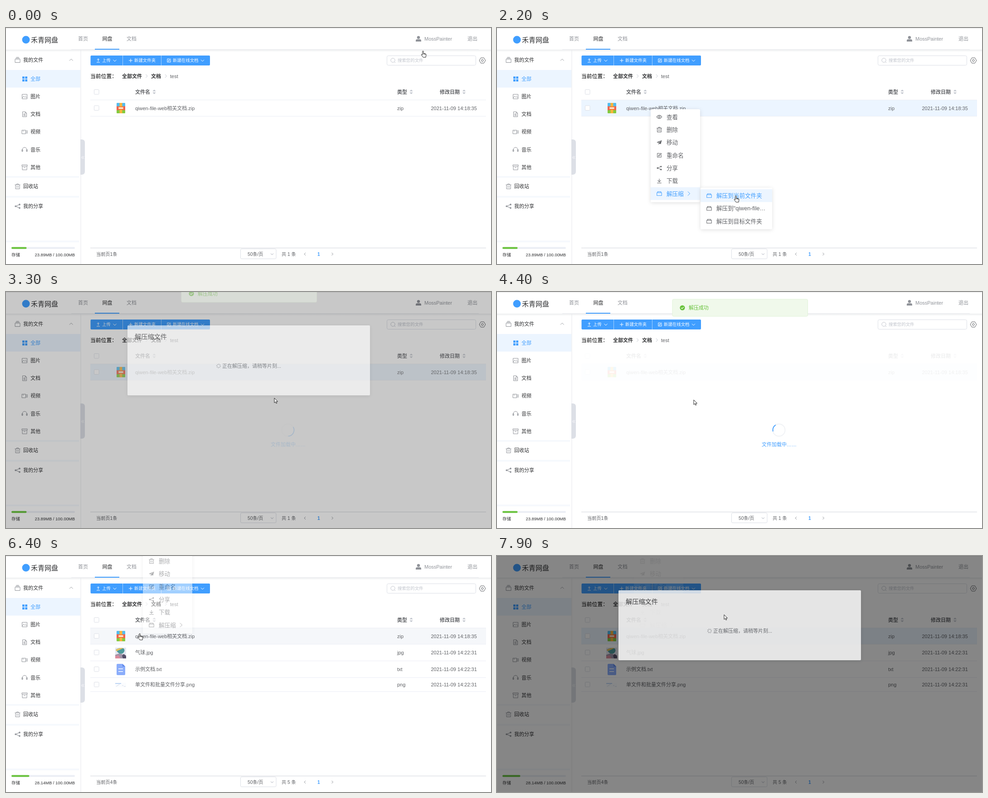
Recreate the animation shown at these times as an HTML page. Size 1070x523 px, loop 8 s.

```html
<!DOCTYPE html>
<html lang="zh-CN">
<head>
<meta charset="utf-8">
<title>网盘在线解压缩</title>
<style>
html, body { margin: 0; width: 100%; height: 100%; overflow: hidden; background: #fff; }
svg { display: block; font-family: "Liberation Sans", "Noto Sans CJK SC", "Noto Sans CJK", sans-serif; }
text { white-space: pre; }
</style>
</head>
<body>
<svg id="stage" width="1070" height="523" viewBox="0 0 1070 523"></svg>
<script>
const LOOP = 8000, STEP = 100;
const BLUE = '#409eff', TEXT = '#606266', DARK = '#303133', GREY = '#909399', PALE = '#c0c4cc';
const LINE = '#dcdfe6', SOFT = '#ebeef5', GREEN = '#67c23a', TINT = '#ecf5ff';
const stage = document.getElementById('stage');

const set = (e, attrs) => { for (const k in attrs) e.setAttribute(k, attrs[k]); return e; };
const add = (parent, tag, attrs = {}) =>
  parent.appendChild(set(document.createElementNS('http://www.w3.org/2000/svg', tag), attrs));
const group = (parent, attrs) => add(parent, 'g', attrs);
const box = (p, x, y, width, height, fill, more) => add(p, 'rect', { x, y, width, height, fill, ...more });
const ring = (p, cx, cy, r, color, width = 1) =>
  add(p, 'circle', { cx, cy, r, fill: 'none', stroke: color, 'stroke-width': width });
const disc = (p, cx, cy, r, fill) => add(p, 'circle', { cx, cy, r, fill });
const stroke = (p, d, color, width = 1, more) =>
  add(p, 'path', { d, fill: 'none', stroke: color, 'stroke-width': width, ...more });
const shape = (p, d, fill) => add(p, 'path', { d, fill });
const label = (p, x, mid, str, size, fill, more) => {
  const e = add(p, 'text', { x, y: mid + size * 0.37, 'font-size': size, fill, ...more });
  e.textContent = str;
  return e;
};
const BOLD = { 'font-weight': 700 };
const move = (e, x, y) => set(e, { transform: `translate(${x} ${y})` });
const fade = (e, a) => set(e, { opacity: a, display: a > 0 ? 'inline' : 'none' });

// Line icons, centred on 0,0
const ICONS = {
  stack: 'M-5.5-2h11v7.5h-11zM-4.5-4h9M-3-6h6',
  image: 'M-5.5-5h11v10h-11zM-5 3l3-4 2.5 2.5 2-1.5 3 3M2-2h1',
  doc: 'M-4.5-5.5h6l3 3v8h-9zM1.5-5.5v3h3M-2.5-1h4M-2.5 1h5M-2.5 3h5',
  video: 'M-6-4h8.5v8H-6zM2.5-1l3.5-2v6l-3.5-2M-4-2h2',
  music: 'M-5 4v-4a5 5 0 0 1 10 0v4M-5 0h-1v4h2V0zM5 0h1v4H4V0z',
  archive: 'M-6-5.5H6v3H-6zM-5-2.5v8H5v-8M-2 .5h4',
  trash: 'M-6-3.5H6M-4.5-3.5v9h9v-9M-2-3.5v-2h4v2M-1.5-1v4M1.5-1v4',
  eye: 'M-6 0q6-8 12 0q-6 8-12 0zM-1.8 0a1.8 1.8 0 1 0 3.6 0a1.8 1.8 0 1 0-3.6 0',
  edit: 'M1-4.5h-5.5v9h9V-1M-2 2l.5-2 5-5 1.5 1.5-5 5z',
  down: 'M0-5v7M-3.5-1L0 2.5 3.5-1M-5 5H5',
  upload: 'M0 2v-6M-2.5-1.5L0-4l2.5 2.5M-3.5 4h7',
  plus: 'M-4 0h8M0-4v8',
  box: 'M-5.5-2h11v6.5h-11zM-4-2v-2.5h8V-2',
  gear: 'M-3.4-5.9h6.8l3.4 5.9-3.4 5.9h-6.8l-3.4-5.9zM-2.3 0a2.3 2.3 0 1 0 4.6 0a2.3 2.3 0 1 0-4.6 0',
  right: 'M-2-4.5L2.5 0-2 4.5',
  dropdown: 'M-3.5-1.5L0 2l3.5-3.5'
};
const icon = (p, name, x, y, color = TEXT, scale = 1) => {
  const g = group(p, { transform: `translate(${x} ${y}) scale(${scale})`, color });
  if (name === 'plane') shape(g, 'M6-5.5L-6-.5l3.5 1.5zM6-5.5L-1.5 1.5v4l2-3 3 1.5z', 'currentColor');
  else if (name === 'share') {
    stroke(g, 'M4-3.5L-4 0l8 3.5', 'currentColor');
    for (const [x, y] of [[4, -3.5], [-4, 0], [4, 3.5]]) disc(g, x, y, 1.7, 'currentColor');
  } else stroke(g, ICONS[name], 'currentColor', 1 / scale, { 'stroke-linejoin': 'round' });
  return g;
};
const carets = (x, y) => {
  for (const s of [-1, 1]) shape(stage, `M${x - 3.7} ${y + 1.3 * s}h7.4l-3.7 ${3.7 * s}z`, PALE);
};
const checkbox = (p, y) => box(p, 194.5, y - 5.5, 10.5, 10.5, '#fff', { stroke: LINE, rx: 1.5 });

const defs = add(stage, 'defs');
const filter = add(defs, 'filter', { id: 'soft', x: '-20%', y: '-20%', width: '140%', height: '140%' });
add(filter, 'feDropShadow', { dx: 0, dy: 1.5, stdDeviation: 4, 'flood-color': 'rgba(0,0,0,.12)' });
const gradient = add(defs, 'linearGradient', { id: 'under', x2: 0, y2: 1 });
add(gradient, 'stop', { 'stop-color': '#e9eaec' });
add(gradient, 'stop', { offset: 1, 'stop-color': '#fff', 'stop-opacity': 0 });

box(stage, 0, 0, 1070, 523, '#fff');

// Table
const art = {
  zip(g) {
    box(g, 244, 166, 19, 23, '#f0604d', { rx: 2 });
    box(g, 244, 166, 19, 7.5, '#52bdf0', { rx: 1.5 });
    box(g, 244, 182, 19, 7, '#83cb3f', { rx: 1.5 });
    box(g, 250.5, 166, 6, 23, '#f8b53c');
    box(g, 247.5, 174, 12, 7, '#f57f45', { rx: 1 });
    box(g, 248.5, 176, 10, 3, '#fff3df');
  },
  jpg(g) {
    box(g, 241, 203, 24, 24, '#e4e6f0');
    shape(g, 'M241 219l9-3 15 4v7h-24z', '#a294a8');
    shape(g, 'M242 208q8-6 18-3q4 6-3 11q-6 2-10-2z', '#4d9a9b');
    shape(g, 'M242 208q8-5 17-4l-15 7z', '#e8c45c');
    shape(g, 'M241 222l7-2 5 7h-12z', '#d98a9c');
    shape(g, 'M256 221l4-4 5 5v5h-7z', '#544e69');
  },
  txt(g) {
    shape(g, 'M246 239h11l6 6v17q0 2-2 2h-15q-2 0-2-2v-21q0-2 2-2z', '#8badfb');
    shape(g, 'M257 239l6 6h-6z', '#5f87e8');
    stroke(g, 'M248 250h10M248 256h10', '#fff', 1.6);
  },
  png(g) {
    box(g, 241, 281, 24, 10, '#fbfcfe');
    stroke(g, 'M241 282.5h13', '#9fc0ee', 1.4);
    stroke(g, 'M243 289l8-5M256 287h3M260 289h4', '#d3dbe9', 1);
  }
};
label(stage, 285, 142, '文件名', 11, TEXT, BOLD);
label(stage, 863, 142, '类型', 11, TEXT, BOLD);
label(stage, 957, 142, '修改日期', 11, TEXT, BOLD);
for (const x of [327, 894, 1010.5]) carets(x, 141.5);
checkbox(stage, 142);
box(stage, 186, 159, 873, 1, SOFT);
let bottom = 160;
const rows = ['qiwen-file-web相关文档.zip', '气球.jpg', '示例文档.txt', '单文件和批量文件分享.png'].map((name, i) => {
  const kind = name.split('.').pop(), top = bottom;
  const height = kind === 'png' ? 31 : i ? 37 : 36, mid = top + height / 2 - 0.5;
  bottom += height;
  const g = group(stage);
  const hover = box(g, 186, top, 873, height, '#f5f7fa');
  const picked = box(g, 186, top, 873, height, TINT);
  box(g, 186, bottom - 1, 873, 1, SOFT);
  checkbox(g, mid);
  art[kind](g);
  label(g, 285, mid, name, 11, TEXT);
  label(g, 863, mid, kind, 11, TEXT);
  label(g, 937.5, mid, '2021-11-09 ' + (i ? '14:22:31' : '14:18:35'), 11, TEXT);
  return { g, hover, picked, top, bottom };
});

// Loading mask
const loading = group(stage);
box(loading, 186, 125, 873, 360, '#fff', { 'fill-opacity': 0.9 });
ring(loading, 622, 306, 13.5, '#f0f2f5', 1.8);
const arc = stroke(loading, '', BLUE, 1.8, { 'stroke-linecap': 'round' });
label(loading, 584, 338, '文件加载中……', 11, BLUE);

// Header
box(stage, 0, 0, 1070, 48, '#fff');
box(stage, 0, 48, 1070, 7, 'url(#under)');
box(stage, 0, 0, 1070, 1, '#e4e4e4');
box(stage, 144, 47, 899, 1, '#eceef1');
disc(stage, 44, 26, 8.5, BLUE);
label(stage, 55, 26, '禾青网盘', 15, DARK);
['首页', '网盘', '文档'].forEach((str, i) => label(stage, 159 + i * 53.5, 24, str, 11, i === 1 ? DARK : GREY));
box(stage, 196, 46, 54, 2, BLUE);
disc(stage, 910, 21, 3.2, GREY);
shape(stage, 'M904 30v-2q0-3 3-3h6q3 0 3 3v2z', GREY);
label(stage, 923, 24, 'MossPainter', 11, GREY);
label(stage, 1018, 24, '退出', 11, GREY);

// Sidebar
box(stage, 164.5, 49, 1, 474, '#e6e8ec');
box(stage, 0, 93, 164, 39, TINT);
icon(stage, 'stack', 25.5, 71, GREY);
label(stage, 38, 71, '我的文件', 11, DARK);
stroke(stage, 'M140 72.5l3.8-3.8 3.8 3.8', GREY, 0.9);
for (const x of [36, 42.2]) for (const y of [107.5, 113.7]) box(stage, x, y, 4.8, 4.8, BLUE);
label(stage, 54, 112.5, '全部', 11, BLUE);
[['image', '图片'], ['doc', '文档'], ['video', '视频'], ['music', '音乐'], ['archive', '其他']].forEach(([name, str], i) => {
  const y = 152 + i * 39.2;
  icon(stage, name, 41, y, GREY);
  label(stage, 54, y, str, 11, DARK);
});
for (const y of [328, 372, 471]) box(stage, 0, y, 161, 4, '#f6f9fd');
icon(stage, 'trash', 25.5, 351, GREY);
label(stage, 38, 351, '回收站', 11, DARK);
icon(stage, 'share', 25.5, 395, GREY, 1.1);
label(stage, 38, 395, '我的分享', 11, DARK);
shape(stage, 'M164 247h3q7 0 7 7v64q0 7-7 7h-3z', LINE);
stroke(stage, 'M169 284l-2.5 3 2.5 3M172 284l-2.5 3 2.5 3', '#fff', 0.9);
box(stage, 12, 485.5, 140, 4, SOFT, { rx: 2 });
const used = box(stage, 12, 485.5, 34, 4, GREEN, { rx: 2 });
label(stage, 12, 503, '存储', 9.44, DARK);
const usedText = label(stage, 152, 503, '', 9.44, DARK, { 'text-anchor': 'end' });

// Toolbar
box(stage, 186.5, 61, 263.5, 22, BLUE, { rx: 2 });
for (const x of [257, 342]) box(stage, x, 61, 1, 22, '#a6d2ff');
icon(stage, 'upload', 203.5, 72, '#fff');
label(stage, 212, 72, '上传', 9.44, '#fff');
icon(stage, 'dropdown', 240, 72, '#fff');
icon(stage, 'plus', 275, 72, '#fff');
label(stage, 283, 72, '新建文件夹', 9.44, '#fff');
icon(stage, 'edit', 359.5, 72, '#fff', 0.8);
label(stage, 368, 72, '新建在线文档', 9.44, '#fff');
icon(stage, 'dropdown', 433.5, 72, '#fff');
box(stage, 840.5, 61.5, 196, 21, '#fff', { stroke: LINE, rx: 3 });
ring(stage, 853.5, 71.5, 4.6, PALE);
stroke(stage, 'M857 75l2.2 2.2', PALE);
label(stage, 864, 72, '搜索您的文件', 9.44, PALE);
icon(stage, 'gear', 1051, 72);

label(stage, 186, 107, '当前位置：', 11.8, '#000');
label(stage, 256, 107, '全部文件', 11, DARK, BOLD);
label(stage, 320, 107, '文档', 11, DARK, BOLD);
label(stage, 362, 107, 'test', 11, TEXT);
for (const x of [310, 352.5]) icon(stage, 'right', x, 106.5, PALE, 0.8);

// Pagination
box(stage, 186, 487, 873, 1, '#d3d6dc');
const pageText = label(stage, 199, 501, '', 10.2, TEXT);
box(stage, 517.5, 489.5, 78.5, 22, '#fff', { stroke: LINE, rx: 2.5 });
label(stage, 533, 501, '50条/页', 10.2, TEXT);
icon(stage, 'dropdown', 587, 501, PALE, 0.85);
const totalText = label(stage, 608, 501, '', 10.2, TEXT);
stroke(stage, 'M661 498l-3 3 3 3', GREY);
stroke(stage, 'M718.5 498l3 3-3 3', GREY);
label(stage, 687, 501, '1', 10.2, BLUE, BOLD);

// Context menu with submenu
const ITEM = 28.33;
const makeMenu = (x, top, width, height, firstMid, entries) => {
  const g = group(stage);
  box(g, x, top, width, height, '#fff', { rx: 3, filter: 'url(#soft)' });
  const items = entries.map(([name, str], i) => {
    const mid = firstMid + i * ITEM;
    const back = box(g, x, mid - ITEM / 2, width, ITEM, TINT);
    const mark = icon(g, name, x + 19, mid, TEXT, 0.95);
    const text = label(g, x + 35, mid, str, 12.6, TEXT);
    return { back, mark, text };
  });
  return { g, items, x, first: firstMid - ITEM / 2 };
};
const light = (items, on) => items.forEach((it, i) => {
  const color = i === on ? BLUE : TEXT;
  fade(it.back, i === on ? 1 : 0);
  set(it.mark, { color });
  set(it.text, { fill: color });
});
const menu = makeMenu(339, 180, 109, 206, 197, [
  ['eye', '查看'], ['trash', '删除'], ['plane', '移动'], ['edit', '重命名'],
  ['share', '分享'], ['down', '下载'], ['box', '解压缩']
]);
const menuArrow = icon(menu.g, 'right', 423, 367);
const sub = makeMenu(449, 354, 158, 92, 371.5, [
  ['box', '解压到当前文件夹'], ['box', '解压到"qiwen-file…'], ['box', '解压到目标文件夹']
]);

// Dialog and message
const overlay = box(stage, 0, 0, 1070, 523, '#000');
const dialog = group(stage);
box(dialog, 268, 0, 535, 155, '#fff', { rx: 2, filter: 'url(#soft)' });
label(dialog, 284, 25, '解压缩文件', 14.2, DARK);
label(dialog, 477, 90, '正在解压缩，请稍等片刻...', 11, TEXT);
const spinner = group(dialog);
for (let i = 0; i < 8; i++) stroke(spinner, 'M0-2.8v-2.2', TEXT, 0.9, { transform: `rotate(${i * 45})` });

const message = group(stage);
box(message, 387, 16, 298.5, 38, '#f0f9eb', { stroke: '#e1f3d8', rx: 3 });
disc(message, 409, 35, 5.6, GREEN);
stroke(message, 'M406.3 35l2 2 3.6-3.8', '#fff', 1.2);
label(message, 423, 35, '解压成功', 11, GREEN);

const pointer = group(stage, { fill: '#fff', stroke: '#111', 'stroke-width': 0.9, 'stroke-linejoin': 'round' });
const arrow = add(pointer, 'path', { d: 'M0 0v10.5l2.5-2.2 1.6 3.7 1.7-.8-1.6-3.5h3.3z' });
const hand = add(pointer, 'path', {
  d: 'M-1.2 1.2a1.2 1.2 0 0 1 2.4 0V5.2l4.4 1q1.5.5 1.3 2.2L6 14H.3L-3.6 8.6q-.2-1.8 1.3-1.2l1.1 1.2zM1.2 5.2v2.3M3.3 5.8v2M5.2 6.3v1.8'
});

// Timing rules
const ramp = (t, start, span) => Math.min(1, Math.max(0, (t - start) / span));
const easeOut = p => 1 - (1 - p) ** 2;
const smooth = p => p * p * (3 - 2 * p);
const show = (t, from, to, span) => easeOut(ramp(t, from, span)) * (1 - easeOut(ramp(t, to, span)));

// Each run: menu opens, submenu opens, an entry is picked; offsets place the two panels
const RUNS = [
  { open: 1000, unfold: 1700, pick: 2500, dx: 0, dy: 0, subDy: 0 },
  { open: 6300, unfold: 6900, pick: 7700, dx: -37, dy: -214, subDy: -275 }
];
const LOADED = 5000, UNPACKED = 3210;
const runAt = t => RUNS[t < LOADED ? 0 : 1];

// Pointer moves: start, duration, end point
const MOVES = [
  [0, 700, 325, 222], [900, 200, 339, 180], [1300, 400, 390, 364], [1800, 400, 527, 372], [2700, 600, 592, 235],
  [3300, 200, 598, 261], [3500, 800, 434, 239], [5300, 800, 295, 172], [6700, 300, 384, 152], [7100, 400, 501, 130]
];
const pointerAt = t => MOVES.reduce(([x, y], [start, span, toX, toY]) => {
  const p = smooth(ramp(t, start, span));
  return [x + (toX - x) * p, y + (toY - y) * p];
}, [920, 51]);

// What the pointer is over
function look(t) {
  const [x, y] = pointerAt(t), run = runAt(t);
  const free = t <= run.pick;
  const subOpen = t >= run.unfold && t <= run.pick;
  const inSub = subOpen && x > sub.x + run.dx;
  const inMenu = free && t > run.open + 100 && x > menu.x + run.dx && y > menu.first + run.dy;
  const row = !inMenu && (free || t > UNPACKED + 300) && x > 186 ? rows.findIndex(r => y >= r.top && y < r.bottom) : -1;
  const onName = row === 0 && x > 285 && x < 416;
  return { x, y, run, subOpen, inSub, inMenu, row, onName };
}

// Hover colour fades after the pointer leaves
const TRAIL = 6;
const hoverOf = (t, i) => {
  for (let k = 0; k < TRAIL; k++) if (look(t - k * STEP).row === i) return 1 - k / TRAIL;
  return 0;
};

function draw(t) {
  const { x, y, run, subOpen, inSub, inMenu, onName } = look(t);
  const loaded = t >= LOADED;

  rows.forEach((r, i) => {
    fade(r.g, i === 0 || loaded ? 1 : 0);
    fade(r.hover, hoverOf(t, i));
    fade(r.picked, i === 0 && t > run.open + (loaded ? 400 : 0) && (loaded || t < LOADED) ? 1 : 0);
  });

  const on = subOpen ? 6 : inMenu ? Math.floor((y - menu.first - run.dy) / ITEM) : -1;
  move(fade(menu.g, show(t, run.open, run.pick, 330)), run.dx, run.dy);
  light(menu.items, on);
  set(menuArrow, { color: on === 6 ? BLUE : TEXT });
  move(fade(sub.g, subOpen ? 1 : 0), run.dx, run.subDy);
  light(sub.items, inSub ? Math.floor((y - sub.first - run.subDy) / ITEM) : -1);

  fade(loading, show(t, UNPACKED + 60, LOADED - 100, 260));
  const start = (170 + (t - 4400) * 0.18) * Math.PI / 180;
  const end = start + 1.13 + 0.85 * Math.sin((t - 4400) / 1500 * 2 * Math.PI);
  const spot = a => `${622 + 13.5 * Math.cos(a)} ${306 + 13.5 * Math.sin(a)}`;
  set(arc, { d: `M${spot(start)}A13.5 13.5 0 0 1 ${spot(end)}` });

  const close = loaded ? LOOP : UNPACKED;
  const pop = show(t, run.pick, close + 15, 370);
  fade(overlay, 0.5 * show(t, run.pick, close, 260));
  move(fade(dialog, pop), 0, 79 - 14 * (1 - pop));
  set(spinner, { transform: `translate(469 90) rotate(${t * 0.18})` });
  const notice = show(t, UNPACKED - 10, 5850, 420);
  move(fade(message, notice), 0, -54 * (1 - notice));

  set(used, { width: 1.4 * (23.89 + 4.25 * easeOut(ramp(t, LOADED, 500))) });
  usedText.textContent = (loaded ? '28.14' : '23.89') + 'MB / 100.00MB';
  pageText.textContent = `当前页${loaded ? 4 : 1}条`;
  totalText.textContent = `共 ${loaded ? 5 : 1} 条`;

  const pointing = t < STEP || onName || inMenu;
  move(pointer, x, y);
  fade(hand, pointing ? 1 : 0);
  fade(arrow, pointing ? 0 : 1);
}

const begin = performance.now();
function tick() {
  const t = (performance.now() - begin) % LOOP;
  draw(Math.floor(t / STEP) * STEP);
  requestAnimationFrame(tick);
}
tick();
</script>
</body>
</html>
```
